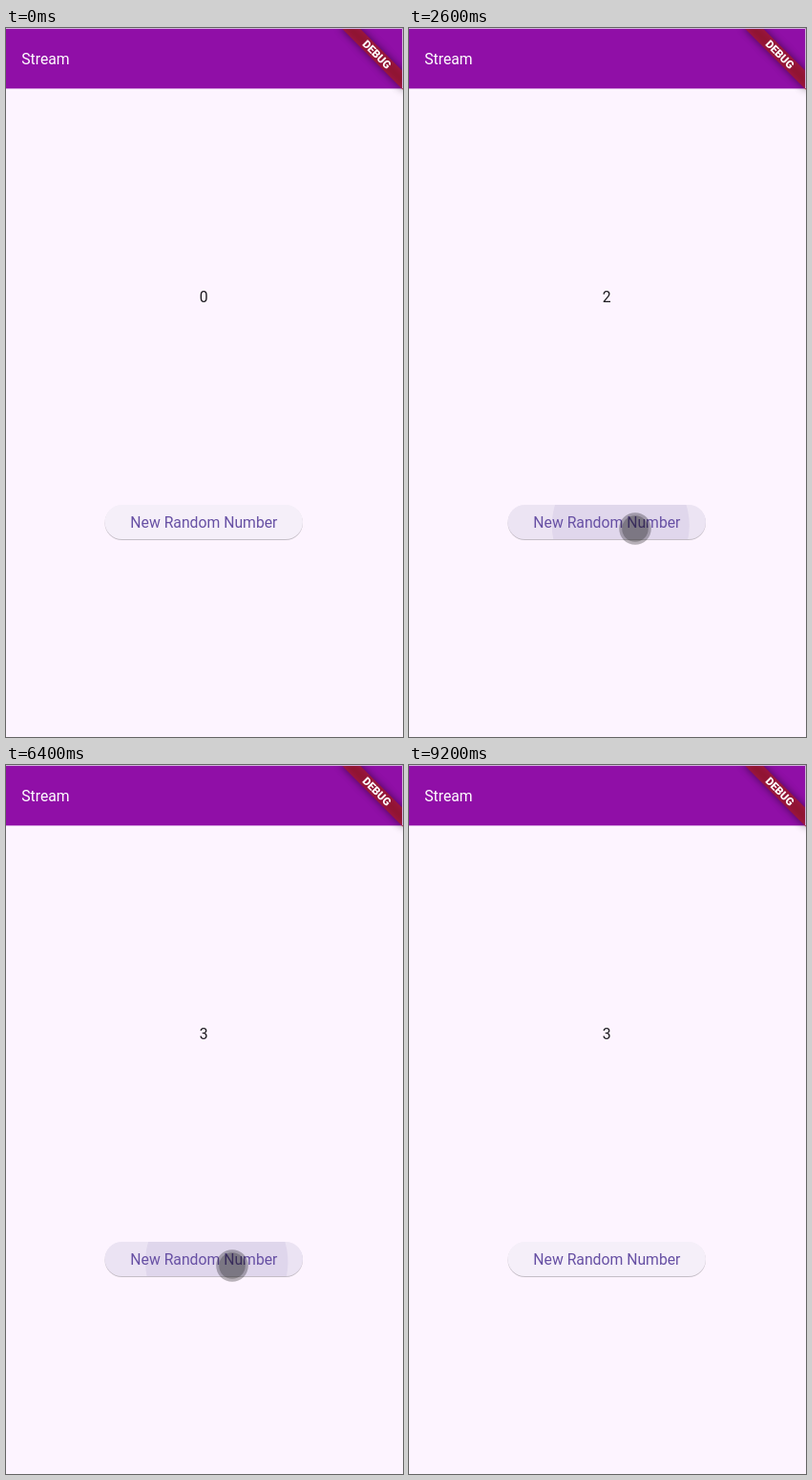
These frames come from a looping animation (416 px wide and 742 px high, 9300 ms). An HTML page:

```html
<!DOCTYPE html>
<html lang="en">
<head>
<meta charset="utf-8">
<title>Stream</title>
<style>
  html, body { margin: 0; width: 100%; height: 100%; overflow: hidden; background: #fdf4ff; }
  svg { display: block; width: 416px; height: 742px; }
  text { font: 400 15.75px Roboto, sans-serif; }
  .banner { font-size: 11.5px; font-weight: 900; }
</style>
</head>
<body>
<svg viewBox="0 0 416 742">
  <defs>
    <clipPath id="pill"><rect x="103.5" y="499" width="207.5" height="36" rx="18"/></clipPath>
    <filter id="soft" x="-50%" y="-200%" width="200%" height="500%"><feGaussianBlur stdDeviation="4.4"/></filter>
    <filter id="lift" x="-10%" y="-30%" width="120%" height="160%"><feGaussianBlur stdDeviation=".7"/></filter>
  </defs>

  <rect width="416" height="742" fill="#fdf4ff"/>
  <rect width="416" height="63.4" fill="#900fa7"/>
  <text x="16.2" y="38.4" fill="#fff">Stream</text>

  <text id="number" x="207.2" y="287.4" text-anchor="middle" fill="#1d1b20">0</text>

  <rect x="103.5" y="500" width="207.5" height="36" rx="18" fill="#000" opacity=".22" filter="url(#lift)"/>
  <g clip-path="url(#pill)">
    <rect x="103" y="499" width="209" height="36" fill="#f5eff9"/>
    <rect id="glow" x="103" y="499" width="209" height="36" fill="#6750a4" opacity="0"/>
    <circle id="ripple" fill="#6750a4" opacity="0"/>
  </g>
  <text x="207.4" y="523" text-anchor="middle" fill="#6750a4">New Random Number</text>

  <g transform="translate(415.6 .6) rotate(45)">
    <rect x="-46" y="31.5" width="92" height="13.5" fill="#000" opacity=".5" filter="url(#soft)"/>
    <rect x="-46" y="31.5" width="92" height="13.5" fill="#b71c1c" opacity=".627"/>
    <text class="banner" y="42.3" text-anchor="middle" fill="#fff">DEBUG</text>
  </g>
  <path d="M0 .5H415.5V63" fill="none" stroke="#d3b3dc"/>

  <g id="touch">
    <circle r="16.8" fill="#000" opacity=".28"/>
    <circle r="13.8" fill="#000" opacity=".23"/>
  </g>
</svg>

<script>
const LOOP = 9300, STEP = 100, HOLD = 90;

// [press time, number shown after release]
const taps = [
  [1207, 3], [1830, 3], [2463, 2], [3230, 3], [4005, 3],
  [4760, 3], [5510, 3], [6259, 3], [7000, 3]
];

// [time, x, y] of the touch pointer
const path = [
  [200, 436, 270], [800, 237, 524], [7500, 237, 524],
  [7900, 223, 502], [8100, 223, 502], [8600, -20, 400]
];

const $ = id => document.getElementById(id);
const clamp = v => Math.min(1, Math.max(0, v));
const mix = (a, b, k) => a + (b - a) * k;
const bezier = (s, a, b) => 3 * s * (1 - s) ** 2 * a + 3 * s * s * (1 - s) * b + s ** 3;

// cubic-bezier(.25, .1, .25, 1)
function ease(t) {
  let lo = 0, hi = 1;
  for (let i = 0; i < 20; i++) {
    const mid = (lo + hi) / 2;
    if (bezier(mid, .25, .25) < t) lo = mid; else hi = mid;
  }
  return bezier(lo, .1, 1);
}

function set(el, attrs) {
  for (const key in attrs) el.setAttribute(key, attrs[key]);
}

function drawRipple(age) {
  const grow = age < HOLD ? age / 1000 : HOLD / 1000 + (age - HOLD) / 225;
  const k = ease(clamp(grow));
  const fade = clamp(age / 75) * (1 - clamp((age - HOLD - 225) / 150));
  set($("ripple"), {
    cx: mix(237, 207.2, k), cy: mix(524, 517, k),
    r: mix(31.6, 110.5, k), opacity: .09 * fade
  });
  const glow = clamp(age / 140) * (1 - clamp((age - 210) / 200));
  set($("glow"), { opacity: .07 * glow });
}

function drawTouch(t) {
  const i = path.findIndex(p => p[0] > t);
  if (i < 1) return set($("touch"), { visibility: "hidden" });
  const [t0, x0, y0] = path[i - 1], [t1, x1, y1] = path[i];
  const k = (t - t0) / (t1 - t0), s = k * k * (3 - 2 * k);
  set($("touch"), {
    visibility: "visible",
    transform: `translate(${mix(x0, x1, s)} ${mix(y0, y1, s)})`
  });
}

function draw(now) {
  const t = Math.floor(now % LOOP / STEP) * STEP;
  const pressed = taps.filter(tap => tap[0] <= t).pop();
  const released = taps.filter(tap => tap[0] + HOLD <= t).pop();
  $("number").textContent = released ? released[1] : 0;
  drawRipple(pressed ? t - pressed[0] : LOOP);
  drawTouch(t);
}

let start;
function tick(now) {
  start ??= now;
  draw(now - start);
  requestAnimationFrame(tick);
}
draw(0);
requestAnimationFrame(tick);
</script>
</body>
</html>
```
